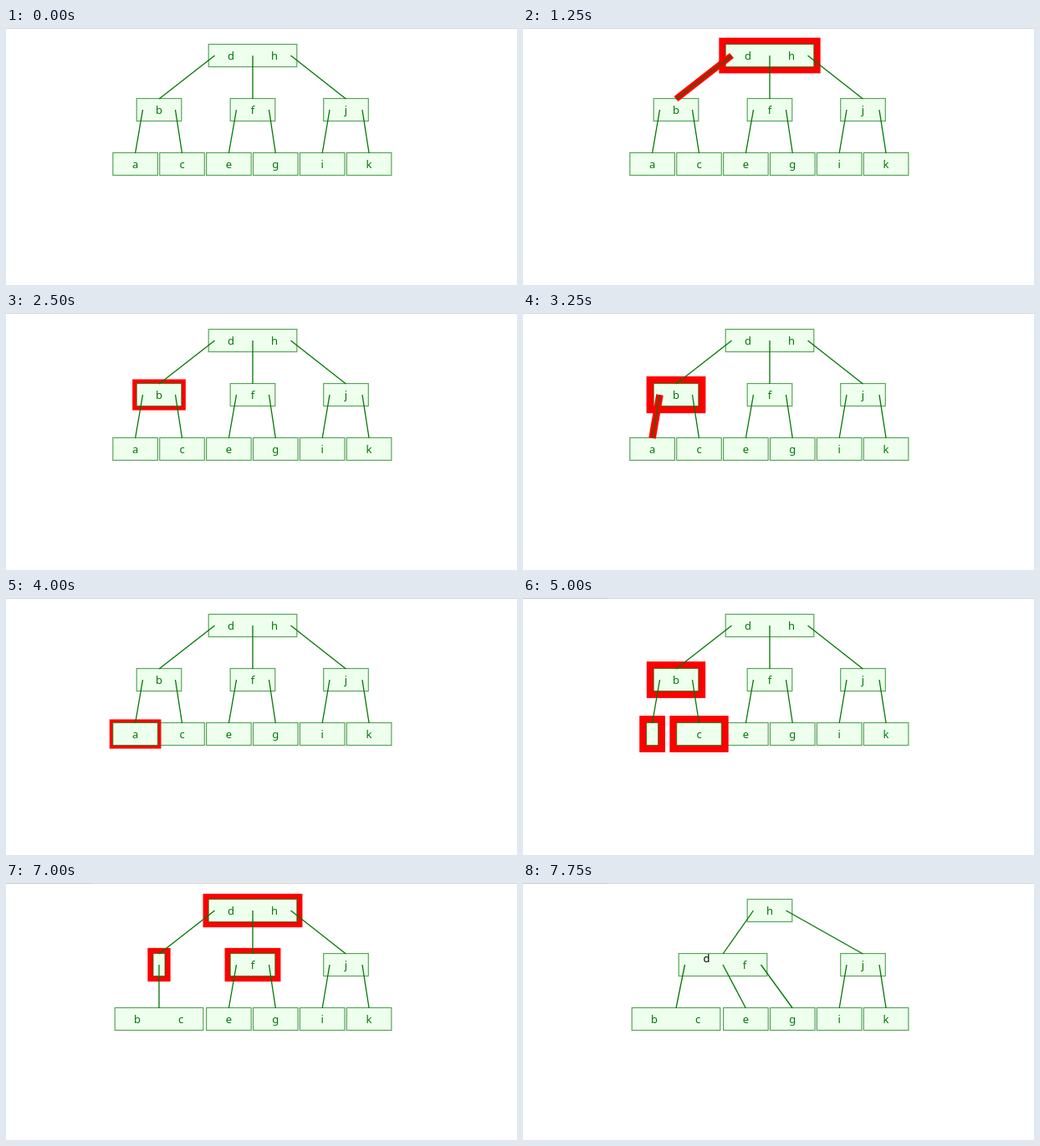
These frames come from a looping animation (611x308 px, 8 s). An HTML page:

```html
<!DOCTYPE html>
<html lang="en">
<head>
<meta charset="utf-8">
<title>B-tree deletion</title>
<style>
  html, body { margin: 0; width: 100%; height: 100%; overflow: hidden; background: #fff; }
  svg { display: block; width: 611px; height: 308px; }
  text { font: 13px "Noto Sans", "Open Sans", sans-serif; text-anchor: middle; fill: #070; }
  .box { fill: #efe; stroke: #070; stroke-opacity: .65; stroke-width: 1.2; }
  .halo { fill: #f00; }
  .edge { stroke: #070; stroke-width: 1.3; }
  .glow { stroke: #f00; }
</style>
</head>
<body>
<svg id="stage" viewBox="0 0 611 308"></svg>
<script>
const LOOP = 8000, TICK = 250, STEP = 3;
const SCALE = 1.3, SLOT = 52, HALF = 13.5, ROWS = [33, 98, 163];
const stage = document.getElementById('stage');

// "_" marks an empty slot
const node = (x, row, keys) => ({ x, y: ROWS[row], keys });
const width = n => n.keys.length ? n.keys.length * SLOT + 1.6 : 14;
const slotX = (n, i) => n.x + (i - (n.keys.length - 1) / 2) * SLOT;

function baseTree() {
  const nodes = {
    root: node(295, 0, 'dh'),
    b: node(183, 1, 'b'), f: node(295, 1, 'f'), j: node(406.5, 1, 'j')
  };
  [...'acegik'].forEach((k, i) => nodes[k] = node(154.6 + i * 55.9, 2, k));
  return {
    nodes,
    kids: { root: ['b', 'f', 'j'], b: ['a', 'c'], f: ['e', 'g'], j: ['i', 'k'] },
    lit: [], glow: '', red: '', label: null
  };
}

function mergeLeaves(s, text) {
  s.nodes.b.keys = '';
  s.nodes.a = node(183, 2, text);
  delete s.nodes.c;
  s.kids.b = ['a'];
}

function mergeInner(s) {
  s.nodes.root.keys = 'h';
  s.nodes.b = node(239, 1, '_f');
  delete s.nodes.f;
  s.kids.root = ['b', 'j'];
  s.kids.b = ['a', 'e', 'g'];
  delete s.kids.f;
}

const move = (key, x0, row, x1, p) =>
  ({ key, x: x0 + (x1 - x0) * p, y: ROWS[row] + (ROWS[row + 1] - ROWS[row]) * p });

// one entry per step; p is the progress inside the step
const steps = [
  s => { s.lit = ['root']; },
  s => { s.lit = ['root']; s.glow = 'root-b'; },
  s => { s.lit = ['b']; },
  s => { s.lit = ['b']; s.glow = 'b-a'; },
  s => { s.lit = ['a']; },
  s => { s.lit = ['a']; s.red = 'a'; },
  s => { s.nodes.a.keys = ''; s.lit = ['b', 'a', 'c']; },
  (s, p) => { mergeLeaves(s, '_c'); s.label = move('b', 183, 1, 157, p); },
  s => { mergeLeaves(s, 'bc'); s.lit = ['root', 'b', 'f']; },
  (s, p) => {
    mergeLeaves(s, 'bc');
    mergeInner(s);
    s.label = move('d', 269, 0, 213, p + .05);
  }
];

function pulse(n) {
  const period = 6.85, k = ((n - 16.1) / period % 1 + 1) % 1;
  return SCALE * (3 + 4 * (1 - Math.abs(2 * k - 1)));
}

const rect = (n, grow, cls) => {
  const w = width(n) + 2 * grow, h = 2 * (HALF + grow);
  return `<rect class="${cls}" x="${n.x - w / 2}" y="${n.y - h / 2}" width="${w}" height="${h}"/>`;
};
const word = (x, y, key, color) =>
  `<text x="${x}" y="${y + 5}"${color ? ` style="fill:${color}"` : ''}>${key}</text>`;

function drawNode(n, halo, red) {
  let out = halo ? rect(n, halo, 'halo') : '';
  out += rect(n, 0, 'box');
  [...n.keys].forEach((k, i) => {
    if (k !== '_') out += word(slotX(n, i), n.y, k, k === red ? '#f00' : '');
  });
  return out;
}

function drawEdge(from, to, i, size, glow) {
  const inset = width(from) / 2 - 7.3;
  let x = from.x;
  if (size > 1 && i === 0) x -= inset;
  else if (size > 1 && i === size - 1) x += inset;
  const at = `x1="${x}" y1="${from.y}" x2="${to.x}" y2="${to.y - 13}"`;
  return (glow ? `<line class="glow" stroke-width="${glow}" ${at}/>` : '') +
    `<line class="edge" ${at}/>`;
}

function draw(n) {
  const s = baseTree(), k = n - 2, beat = pulse(n);
  if (k >= 0) steps[Math.floor(k / STEP)](s, (k % STEP + .5) / STEP);

  let out = '<rect width="611" height="1" fill="#d8d8d8"/>';
  if (n >= 17) out += '<rect width="102" height="1" fill="#c8c8c8"/>';
  const ids = Object.keys(s.nodes);
  ids.filter(id => !s.lit.includes(id)).forEach(id => out += drawNode(s.nodes[id], 0, s.red));
  ids.filter(id => s.lit.includes(id)).forEach(id => out += drawNode(s.nodes[id], beat, s.red));
  for (const id in s.kids) {
    s.kids[id].forEach((kid, i, all) => {
      const glow = s.glow === id + '-' + kid ? beat : 0;
      out += drawEdge(s.nodes[id], s.nodes[kid], i, all.length, glow);
    });
  }
  if (s.label) out += word(s.label.x, s.label.y, s.label.key, '#000');
  stage.innerHTML = out;
}

const start = performance.now();
let last = -1;
function frame(now) {
  const n = Math.floor(Math.max(0, now - start) % LOOP / TICK);
  if (n !== last) draw(last = n);
  requestAnimationFrame(frame);
}
draw(0);
requestAnimationFrame(frame);
</script>
</body>
</html>
```
